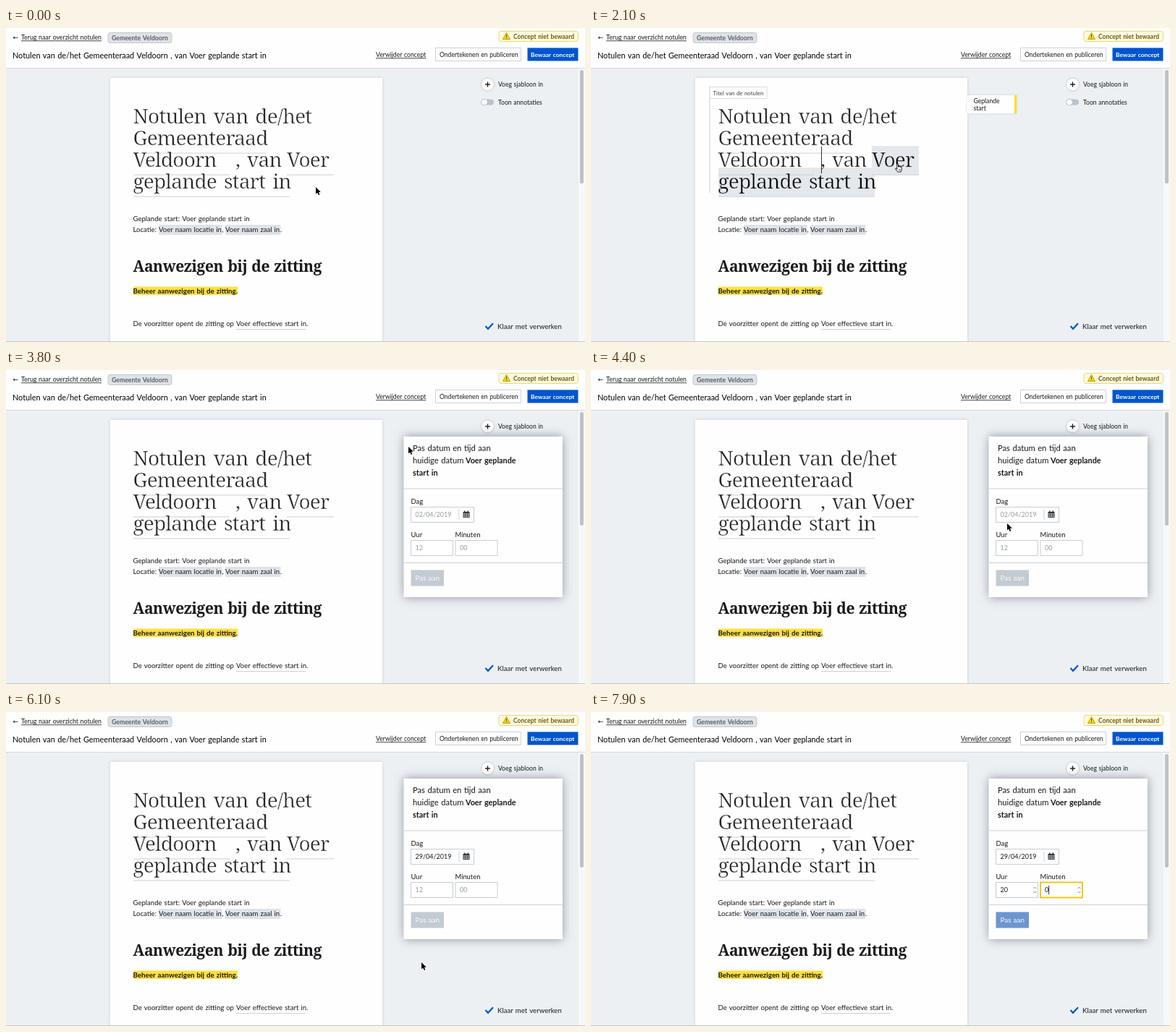
An HTML page with a canvas that plays this animation: 800 by 434 pixels, repeating every 8000 ms.

```html
<!DOCTYPE html>
<html lang="nl">
<head>
<meta charset="utf-8">
<title>Notulen</title>
<style>
  html, body { margin: 0; width: 100%; height: 100%; overflow: hidden; background: #edf0f3; }
  canvas { display: block; width: 100vw; height: 100vh; }
</style>
</head>
<body>
<canvas id="stage"></canvas>
<script>
const W = 800, H = 434, LOOP = 8000, STEP = 100;
const canvas = document.getElementById('stage');
const ctx = canvas.getContext('2d');
const dpr = window.devicePixelRatio || 1;
canvas.width = W * dpr;
canvas.height = H * dpr;

const SANS = 'Lato, "Open Sans", sans-serif';
const SERIF = '"Noto Serif", serif';
const INK = '#18191c', BLUE = '#0055cc', LINE = '#cbd2d9', YELLOW = '#f2c61c', MUTED = '#969ba1';
const PAPER = '#fefefe', FIELD = '#e4e8ed', RULE = '#cdd1d5';
const BODY = 9.55;
const TOWN = 'Veldoorn';

// Moments at which the interface changes, in ms
const AT = {
  annotate: 2100, panel: 3800, calendar: 4700, picked: 5900,
  hour: 6900, typing: 7200, typed: 7300, minute: 7500, done: 7900
};

// Pointer stops: time, x, y
const PATH = [
  [0, 428, 220], [200, 428, 220], [1200, 424, 191], [2600, 424, 191], [2800, 424, 194],
  [3100, 424, 194], [3700, 556, 106], [3900, 556, 106], [4400, 575, 212], [4700, 586, 204],
  [5100, 586, 204], [5700, 574, 346], [6200, 574, 346], [6800, 588, 246]
];

function rect(x, y, w, h, fill) {
  ctx.fillStyle = fill;
  ctx.fillRect(x, y, w, h);
}

function box(x, y, w, h, fill, stroke, r = 0, lw = 1) {
  ctx.beginPath();
  ctx.roundRect(x, y, w, h, r);
  if (fill) { ctx.fillStyle = fill; ctx.fill(); }
  if (stroke) { ctx.strokeStyle = stroke; ctx.lineWidth = lw; ctx.stroke(); }
}

function disc(x, y, r, fill, stroke) {
  ctx.beginPath();
  ctx.arc(x, y, r, 0, Math.PI * 2);
  ctx.fillStyle = fill;
  ctx.fill();
  if (stroke) { ctx.strokeStyle = stroke; ctx.lineWidth = 1; ctx.stroke(); }
}

function poly(points, stroke, lw = 1, fill) {
  ctx.beginPath();
  points.forEach(([x, y]) => ctx.lineTo(x, y));
  if (fill) { ctx.closePath(); ctx.fillStyle = fill; ctx.fill(); }
  if (stroke) { ctx.strokeStyle = stroke; ctx.lineWidth = lw; ctx.stroke(); }
}

function shadowed(blur, color, draw) {
  ctx.save();
  ctx.shadowBlur = blur * dpr;
  ctx.shadowColor = color;
  draw();
  ctx.restore();
}

// "thin" is a background colour used to shave the letter edges
function text(str, x, y, size, opt = {}) {
  const { color = INK, weight = 400, family = SANS, align = 'left', track = 0, gap = size * 0.06, under, thin } = opt;
  ctx.font = `${weight} ${size}px ${family}`;
  ctx.letterSpacing = `${track}px`;
  ctx.wordSpacing = `${gap}px`;
  ctx.textAlign = align;
  ctx.fillStyle = color;
  ctx.fillText(str, x, y);
  if (thin) {
    ctx.strokeStyle = thin;
    ctx.lineWidth = 0.55;
    ctx.strokeText(str, x, y);
  }
  if (under) {
    const w = ctx.measureText(str).width;
    rect(align === 'center' ? x - w / 2 : x, y + 1.4, w, 0.8, color);
  }
}

const bold = (color = INK) => ({ weight: 700, color });

function drawHeader() {
  rect(0, 0, W, 55, PAPER);
  rect(0, 55, W, 1, '#d3d9de');

  text('←', 9.5, 16, 9, { family: '"DejaVu Sans", sans-serif' });
  text('Terug naar overzicht notulen', 21, 16, 8.75, { under: true });
  box(141, 6.5, 88, 14, '#dfe2e6', '#c3c8ce', 3);
  text('Gemeente ' + TOWN, 146, 16.5, 8.7, bold('#5a6068'));
  text(`Notulen van de/het Gemeenteraad ${TOWN} , van Voer geplande start in`, 9, 42, 10.85, { color: '#000' });

  box(681, 4.5, 109.5, 14, '#fffadc', '#ead779', 3);
  poly([[691.5, 6.5], [696.5, 15.5], [686.5, 15.5]], '#a88808', 0.8, '#ffd800');
  rect(691, 9, 1, 3.5, '#5e4d08');
  rect(691, 13.3, 1, 1, '#5e4d08');
  text('Concept niet bewaard', 701, 14.5, 8.5, bold('#6a5a1c'));

  text('Verwijder concept', 511, 40, 8.65, { under: true });
  box(593.5, 27.5, 118, 18, '#fff', LINE);
  text('Ondertekenen en publiceren', 599, 39.5, 8.6);
  rect(720.5, 27.5, 70, 18, BLUE);
  text('Bewaar concept', 725, 40, 8.4, bold('#fff'));
}

function drawSidebar() {
  shadowed(2, 'rgba(60,75,90,.12)', () => disc(665.5, 78, 9, '#fff', '#d3d9de'));
  rect(662, 77.3, 7, 1.4, INK);
  rect(664.8, 74.5, 1.4, 7, INK);
  text('Voeg sjabloon in', 680, 81, 8.5);
  box(656.5, 98.5, 17.5, 8, '#b8c3ce', null, 4);
  disc(661, 102.5, 4.3, '#fff', '#b8c3ce');
  text('Toon annotaties', 680, 105.5, 8.6);
  poly([[662.5, 412], [666, 415.8], [673, 408.3]], BLUE, 2.2);
  text('Klaar met verwerken', 679, 415.5, 9.65);
}

function drawTitle(active) {
  if (active) {
    rect(388, 163, 65, 40, FIELD);
    rect(176, 193, 216, 40, FIELD);
  }
  [[176, 173, 183], [176, 203, 133], [388, 203, 65], [176, 233, 216]]
    .forEach(([x, y, w]) => rect(x, y - 0.5, w, 1, RULE));

  const plain = { family: SERIF, weight: 300, track: -0.8, gap: 3.5, color: '#222', thin: PAPER };
  const start = active ? { ...plain, color: '#000', thin: FIELD } : plain;
  text('Notulen van de/het', 175.5, 132, 28, plain);
  text('Gemeenteraad', 175.5, 162, 28, plain);
  text(TOWN, 175.5, 192, 28, plain);
  text(',', 317, 192, 28, plain);
  text('van', 333, 192, 28, plain);
  text('Voer', 388, 192, 28, start);
  text('geplande start in', 175.5, 222, 28, start);
}

function drawPage(t) {
  const active = t >= AT.annotate && t < AT.panel;
  shadowed(4, 'rgba(50,60,75,.18)', () => rect(144, 69, 376, 380, PAPER));
  drawTitle(active);

  text('Geplande start: Voer geplande start in', 175.5, 267, BODY);
  rect(211, 272, 87.5, 14, '#dfe3e8');
  rect(303, 272, 76.5, 14, '#dfe3e8');
  text('Locatie:', 175.5, 282, BODY);
  text('Voer naam locatie in', 211, 282, BODY);
  text(',', 298.5, 282, BODY);
  text('Voer naam zaal in', 303, 282, BODY);
  text('.', 379, 282, BODY);

  text('Aanwezigen bij de zitting', 175.5, 337, 21, { family: SERIF, weight: 700, track: -0.4, gap: 1 });
  rect(176, 357.5, 144, 11.5, '#ffe03f');
  text('Beheer aanwezigen bij de zitting.', 175.5, 366.5, 9.75, bold());
  text('De voorzitter opent de zitting op', 175.5, 411.5, BODY);
  text('Voer effectieve start in.', 318, 411.5, BODY);
  rect(318, 416, 96, 1, RULE);

  if (active) drawAnnotation(t);
}

function drawAnnotation(t) {
  rect(163.5, 81, 1, 147, '#c9cdd1');
  box(164, 81.5, 79, 16, PAPER, '#d9dce0');
  text('Titel van de notulen', 168.5, 92.5, 7.85, { color: '#3c4045' });
  shadowed(3, 'rgba(50,60,75,.18)', () => rect(520, 93, 68, 25, PAPER));
  rect(585, 93, 3, 25, '#ffe11f');
  text('Geplande', 528.5, 104, 8.6);
  text('start', 528.5, 113.5, 8.6);
  if ((t - AT.annotate) % 1000 < 500) rect(318, 164, 0.9, 37, INK);
}

function field(x, y, w, h, value, { focus, ghost, caret } = {}) {
  box(x + 0.5, y + 0.5, w - 1, h - 1, '#fff', focus ? YELLOW : '#c6cdd4', 0, focus ? 2 : 1);
  text(value, x + 6.5, y + h / 2 + 3.2, 9, { color: ghost ? MUTED : INK });
  if (caret) {
    const offset = ghost ? 0 : ctx.measureText(value).width;
    rect(x + 6.5 + offset, y + 5, 0.9, h - 10, INK);
  }
}

function spinner(x, y) {
  poly([[x - 2, y - 2], [x, y - 4], [x + 2, y - 2]], '#777', 0.9);
  poly([[x - 2, y + 2], [x, y + 4], [x + 2, y + 2]], '#777', 0.9);
}

function drawPanel(t) {
  const picking = t >= AT.calendar && t < AT.picked;
  const onHour = t >= AT.hour && t < AT.minute;
  const onMinute = t >= AT.minute;

  shadowed(13, 'rgba(40,50,65,.5)', () => rect(549.5, 92, 219.5, 222, PAPER));
  text('Pas datum en tijd aan', 562, 112, 11.2);
  text('huidige datum', 562, 129, 11.2);
  text('Voer geplande', 635, 129, 10.8, bold());
  text('start in', 562, 146, 10.9, bold());
  rect(549.5, 163.5, 219.5, 1, LINE);
  rect(549.5, 266, 219.5, 1, LINE);

  text('Dag', 559.5, 184.5, 9.5);
  field(559, 189, 88, 22, t < AT.picked ? '02/04/2019' : '29/04/2019',
    { focus: picking, ghost: t < AT.picked, caret: picking && (t - AT.calendar) % 1000 < 500 });
  rect(625.5, 192.5, 1, 15, LINE);
  drawDateIcon(631.5, 195);

  text('Uur', 559.5, 231, 9.5);
  text('Minuten', 620.5, 231, 9.4);
  const hour = t < AT.typing ? '12' : t < AT.typed ? '2' : '20';
  field(559, 235, 59, 22, hour, { focus: onHour, ghost: t < AT.typing, caret: onHour });
  field(620.5, 235, 59, 22, t < AT.done ? '00' : '0', { focus: onMinute, ghost: t < AT.done, caret: onMinute });
  if (t >= AT.hour) spinner(613.5, 246);
  if (onMinute) spinner(674.5, 246);

  rect(559.5, 276.5, 45.5, 22, t < AT.done ? '#c3cbd2' : '#6c96d0');
  text('Pas aan', 565.5, 291, 9.9, { color: '#f6f8fa' });

  if (picking) drawCalendar();
}

function drawDateIcon(x, y) {
  rect(x, y + 1, 9, 8, '#33363a');
  rect(x + 1.5, y - 0.5, 1.5, 2, '#33363a');
  rect(x + 6, y - 0.5, 1.5, 2, '#33363a');
  for (let i = 0; i < 9; i++) rect(x + 1 + (i % 3) * 2.6, y + 3.2 + Math.floor(i / 3) * 1.9, 1.7, 1, '#fff');
}

function drawCalendar() {
  shadowed(9, 'rgba(40,50,65,.45)', () => rect(550, 211, 188, 155, PAPER));
  [[571, -1], [717, 1]].forEach(([x, dir]) => {
    disc(x, 225, 7.8, '#e5e8eb');
    poly([[x - dir * 1.2, 222], [x + dir * 1.6, 225], [x - dir * 1.2, 228]], INK, 1.4);
  });
  text('april', 623, 228.5, 9, { weight: 700, color: BLUE, under: true });
  text('2019', 646, 228.5, 8.1, { weight: 700, color: BLUE, under: true });
  rect(562, 241, 163, 0.8, '#d8dde2');
  rect(562, 262, 163, 0.8, '#cdd4da');

  const column = i => 574.3 + i * 23.15;
  ['MAA', 'DIN', 'WOE', 'DON', 'VRI', 'ZAT', 'ZON'].forEach((day, i) =>
    text(day, column(i), 253.5, 6.3, { weight: 700, align: 'center', under: true }));
  for (let d = 1; d <= 30; d++) {
    const row = Math.floor((d - 1) / 7);
    text(d, column((d - 1) % 7), 276 + row * 19.3, 7.7, { weight: d === 2 ? 700 : 400, align: 'center' });
  }
}

function pointerAt(t) {
  const i = PATH.findIndex(p => p[0] > t);
  if (i < 0) return PATH[PATH.length - 1].slice(1);
  const [t0, x0, y0] = PATH[i - 1], [t1, x1, y1] = PATH[i];
  const k = (t - t0) / (t1 - t0), e = k * k * (3 - 2 * k);
  return [x0 + (x1 - x0) * e, y0 + (y1 - y0) * e];
}

function pointerKind(t, x, y) {
  if (t < AT.annotate) return y < 215 ? 'beam' : 'arrow';
  if (t < AT.panel) return x < 453 || x > 520 ? 'hand' : 'arrow';
  if (t < AT.calendar) return y > 189 && y < 210 ? 'beam' : 'arrow';
  if (t < AT.picked) return y < 211 ? 'beam' : y > 266 ? 'hand' : 'arrow';
  return y > 235 && y < 257 ? 'beam' : 'arrow';
}

const SHAPES = {
  arrow() {
    const outline = [[0, 0], [0, 9.6], [2.1, 7.6], [3.7, 11], [5.4, 10.2], [3.9, 7], [6.8, 6.8], [0, 0]];
    poly(outline, '#fff', 1.8);
    poly(outline, null, 0, '#000');
  },
  beam() {
    [['#fff', 2.2], ['#222', 1]].forEach(([color, lw]) => {
      poly([[-2.2, -5], [0, -4], [0, 4], [-2.2, 5]], color, lw);
      poly([[2.2, -5], [0, -4], [0, 4], [2.2, 5]], color, lw);
    });
  },
  hand() {
    ctx.lineJoin = 'round';
    poly([[-1.5, -3], [0.2, -3], [0.6, 1], [2.2, 0.6], [3.8, 1.2], [5.2, 1.8], [5.4, 4.5], [4, 8], [-0.2, 8],
      [-3.4, 4], [-3, 2.8], [-1, 4.2], [-1.5, -3]], '#222', 1, '#fff');
    [1.2, 2.6, 4].forEach(x => rect(x - 0.4, 4, 0.7, 2.4, '#555'));
  }
};

function drawPointer(t) {
  if (t >= AT.typing) return;
  const [x, y] = pointerAt(t);
  ctx.save();
  ctx.translate(x, y);
  SHAPES[pointerKind(t, x, y)]();
  ctx.restore();
}

function draw(t) {
  ctx.setTransform(dpr, 0, 0, dpr, 0, 0);
  rect(0, 0, W, H, '#edf0f3');
  drawPage(t);
  drawSidebar();
  drawHeader();
  rect(791, 56, 9, H - 56, '#f7f8f9');
  box(793, 58, 5, 157, '#bfc1c3', null, 2.5);
  if (t >= AT.panel) drawPanel(t);
  rect(0, 433, W, 1, '#c4c6c8');
  drawPointer(t);
}

const start = performance.now();
function tick() {
  const t = (performance.now() - start) % LOOP;
  draw(Math.floor(t / STEP) * STEP);
  requestAnimationFrame(tick);
}
tick();
</script>
</body>
</html>
```
